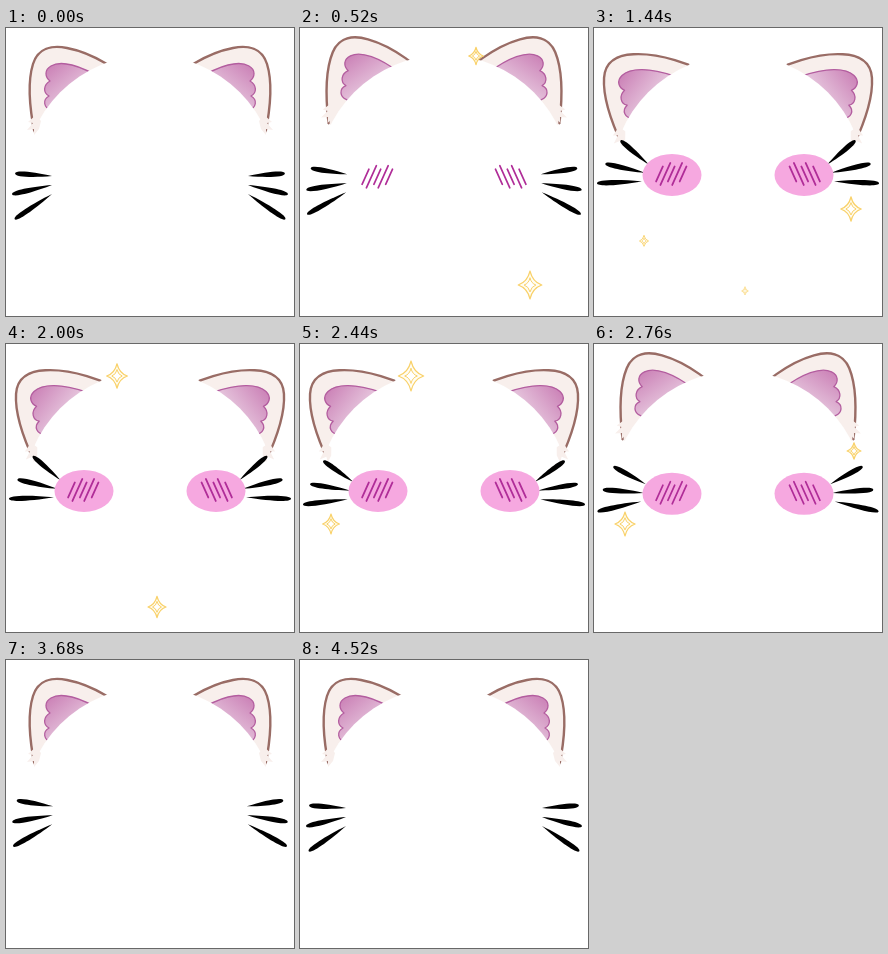
Write an HTML page with a canvas that moves like this. It is 288 px wide and 288 px high and loops after 5120 ms.

```html
<!DOCTYPE html>
<html lang="en">
<head>
<meta charset="utf-8">
<title>Cat face</title>
<style>
html, body { margin: 0; width: 100%; height: 100%; overflow: hidden; background: #fff }
canvas { display: block }
</style>
</head>
<body>
<canvas id="stage" width="288" height="288"></canvas>
<script>
const ctx = document.getElementById('stage').getContext('2d');
const LOOP = 5120, LAST = 54, SPARKLE_LIFE = 11;

const earTop = 'M29 107C23 78 22 52 27 36C32 20 46 17 61 20C77 23 89 29 100 35.5L112 43';
const earEdge = new Path2D(earTop);
const earShape = new Path2D(earTop + 'L125 55L60 125Z');
const earInner = new Path2D('M96 51C74 37 55 32 45 38C38 42 39 49 44 53C37 57 37 65 43 68C36 72 38 80 45 82L95 110Z');
const tuft = new Path2D('M30 87L22 94L27 95L21 102L28 101L28 107L33 101L35 93Z');

const earPink = ctx.createLinearGradient(45, 38, 74, 74);
earPink.addColorStop(0, '#cc84b8');
earPink.addColorStop(1, '#ebd2e4');

// resting and raised angle of each whisker, in degrees
const whiskerAngles = [[4, 42], [-13, 14], [-34, -1]];

const sparkles = [
  { x: 230, y: 257, size: 14, start: 1 },
  { x: 176, y: 28, size: 14, start: 3.7 },
  { x: 50, y: 213, size: 19, start: 7 },
  { x: 257, y: 181, size: 12.5, start: 12.5 },
  { x: 151, y: 263, size: 14, start: 16 },
  { x: 111, y: 32, size: 18, start: 21.4 },
  { x: 31, y: 180, size: 13, start: 26 },
  { x: 260, y: 107, size: 15, start: 31 }
];

const rad = deg => deg * Math.PI / 180;
const lerp = (a, b, u) => a + (b - a) * u;
const clamp = (v, lo, hi) => Math.min(hi, Math.max(lo, v));

// eased 0 to 1 as step goes from a to b
function ease(step, a, b) {
  const u = clamp((step - a) / (b - a), 0, 1);
  return u * u * (3 - 2 * u);
}

// ears perk up, flick down three times, then settle
function earPose(step) {
  const flick = Math.cos((clamp(step, 14.5, 32.5) - 14.5) / 6 * 2 * Math.PI);
  const amount = ease(step, 1, 6) * (1 - ease(step, 37, 43));
  return {
    angle: amount * (-5 + 10 * flick),
    dx: amount * (-5 + 8.5 * flick),
    dy: amount * (-1.7 - 6.8 * flick)
  };
}

const whiskerLift = step => ease(step, 2, 19) * (1 - ease(step, 21, 51));

function bothSides(draw) {
  draw();
  ctx.save();
  ctx.translate(288, 0);
  ctx.scale(-1, 1);
  draw();
  ctx.restore();
}

function paint(path, fill, stroke, width) {
  if (fill) { ctx.fillStyle = fill; ctx.fill(path); }
  if (stroke) { ctx.strokeStyle = stroke; ctx.lineWidth = width; ctx.stroke(path); }
}

function inEarSpace({ angle, dx, dy }, draw) {
  ctx.save();
  ctx.translate(65 + dx, 60 + dy);
  ctx.rotate(rad(angle));
  ctx.translate(-65, -60);
  draw();
  ctx.restore();
}

function drawEars(ear) {
  bothSides(() => inEarSpace(ear, () => {
    paint(earShape, '#f8efec');
    paint(earEdge, null, '#996c65', 2.4);
    paint(earInner, earPink, '#b35d9f', 1.3);
  }));
  // the white head hides the base of the ears
  const head = new Path2D();
  head.arc(144, 154, 127, 0, 7);
  paint(head, '#fff');
  bothSides(() => inEarSpace(ear, () => paint(tuft, '#f8efec')));
}

// pointed at the root, blunt at the tip
function drawWhisker(i, lift) {
  const length = 37 + 4 * i;
  const path = new Path2D();
  path.moveTo(0, 0);
  path.bezierCurveTo(-length * 0.5, -3, -length, -3.8, -length, 0);
  path.bezierCurveTo(-length, 3.8, -length * 0.5, 3, 0, 0);
  ctx.save();
  ctx.translate(lerp(46, 55 - 3.5 * i, lift), lerp(148 + 9 * i, 136 + 8.5 * i, lift));
  ctx.rotate(rad(lerp(...whiskerAngles[i], lift)));
  paint(path, '#000');
  ctx.restore();
}

function drawBlush(step, y) {
  if (step >= 7 && step < 36) {
    const cheek = new Path2D();
    cheek.ellipse(78, y, 29.5, 21, 0, 0, 7);
    paint(cheek, '#f6a8e0');
  }
  if (step >= 5 && step < 39) {
    const scratches = new Path2D();
    for (let i = 0; i < 5; i++) {
      const x = 65.5 + 5.9 * i, half = i % 2 ? 11 : 7.5;
      scratches.moveTo(x + half * 0.45, y - 1 - half);
      scratches.lineTo(x - half * 0.45, y - 1 + half);
    }
    paint(scratches, null, '#b02d98', 1.8);
  }
}

function star(x, y, h) {
  const w = h * 0.85, c = 0.22, path = new Path2D();
  path.moveTo(x, y - h);
  path.quadraticCurveTo(x + w * c, y - h * c, x + w, y);
  path.quadraticCurveTo(x + w * c, y + h * c, x, y + h);
  path.quadraticCurveTo(x - w * c, y + h * c, x - w, y);
  path.quadraticCurveTo(x - w * c, y - h * c, x, y - h);
  return path;
}

function drawSparkle({ x, y, size, start }, step) {
  const u = (step - start) / SPARKLE_LIFE;
  if (u <= 0 || u >= 1) return;
  const h = size * Math.sin(Math.PI * u);
  paint(star(x, y, h), '#fffdf4', '#f9d169', Math.min(1.3, h / 6));
  paint(star(x, y, h * 0.5), '#fff', '#f9d169', Math.min(1, h / 8));
}

// twelve steps a second, the first of each second a little longer
function stepAt(ms) {
  const inSecond = Math.max(0, Math.floor((ms % 1000 - 40) / 80));
  return Math.min(LAST, 12 * Math.floor(ms / 1000) + inSecond);
}

function draw() {
  const step = stepAt(performance.now() % LOOP);
  const ear = earPose(step), lift = whiskerLift(step);
  ctx.clearRect(0, 0, 288, 288);
  ctx.lineCap = ctx.lineJoin = 'round';
  drawEars(ear);
  bothSides(() => {
    for (let i = 0; i < 3; i++) drawWhisker(i, lift);
    drawBlush(step, 149 + ear.angle * 0.15);
  });
  sparkles.forEach(sparkle => drawSparkle(sparkle, step));
  requestAnimationFrame(draw);
}
draw();
</script>
</body>
</html>
```
